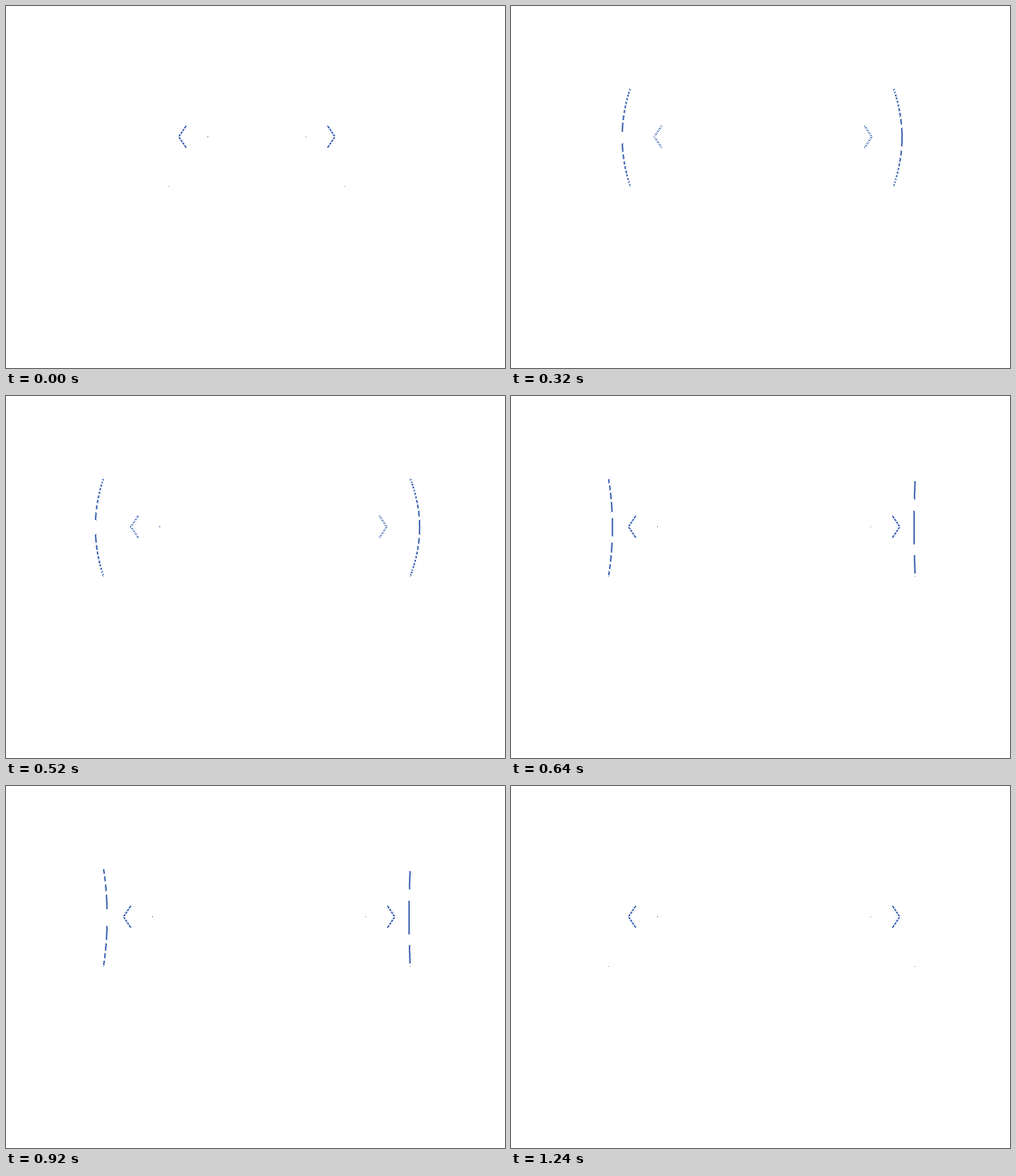
An HTML page with a canvas for the animation above (1640 ms loop, 550x400 px).

```html
<!DOCTYPE html>
<html lang="en">
<head>
<meta charset="utf-8">
<title>Flexing arcs</title>
<style>
html, body { margin: 0; width: 100%; height: 100%; overflow: hidden; background: #fff; }
canvas { display: block; width: 550px; height: 400px; }
</style>
</head>
<body>
<canvas id="stage" width="550" height="400"></canvas>
<script>
const LOOP = 1640, TICK = 40, LAST = 31;
const INK = [0, 51, 153];
const SUB = 4; // samples per pixel, each way
const SOLID = 13; // sample count from which a pixel counts as solid ink
const AREA = { x: 85, y: 85, w: 385, h: 120 };
const TOP = 91, BOTTOM = 199.25, AXIS = 144.5;

// dir: outward direction; bend: [tick, sagitta] keys
const sides = [
  { dir: -1, end: 179.5, tip: 190.5, tail: 222.6, travel: 61,
    bend: [[0, 0], [12, 13.5], [18, -13.2], [28, 5.2], [31, 0]] },
  { dir: 1, end: 373.5, tip: 362.5, tail: 330.75, travel: 66,
    bend: [[0, 0], [12, 14.3], [18, -9.1], [28, 6.5], [31, 0]] }
];

const ctx = document.getElementById('stage').getContext('2d');
const image = ctx.createImageData(AREA.w, AREA.h);
const fine = document.createElement('canvas');
fine.width = AREA.w * SUB;
fine.height = AREA.h * SUB;
const pen = fine.getContext('2d', { willReadFrequently: true });
pen.setTransform(SUB, 0, 0, SUB, -AREA.x * SUB, -AREA.y * SUB);
pen.lineWidth = 1;
pen.lineJoin = 'round';

function tween(keys, n) {
  let i = 1;
  while (i < keys.length - 1 && n > keys[i][0]) i++;
  const [n0, v0] = keys[i - 1], [n1, v1] = keys[i];
  return v0 + (v1 - v0) * (n - n0) / (n1 - n0);
}

function drawSide(side, n) {
  const { dir } = side;
  const x = side.end + dir * 6 * Math.min(n, 12);
  const shift = dir * side.travel * Math.min(n, 15) / 15;
  const tip = side.tip + shift, barb = tip - dir * 8;
  pen.beginPath();
  pen.moveTo(x, TOP);
  pen.quadraticCurveTo(x + dir * 2 * tween(side.bend, n), (TOP + BOTTOM) / 2, x, BOTTOM);
  pen.moveTo(barb, AXIS - 12);
  pen.lineTo(tip, AXIS);
  pen.lineTo(barb, AXIS + 12);
  pen.moveTo(tip, AXIS);
  pen.lineTo(side.tail + shift, AXIS);
  pen.stroke();
}

// Solid ink is see-through: only the soft edge pixels of each line show.
function showEdges() {
  const src = pen.getImageData(0, 0, fine.width, fine.height).data;
  const hits = new Uint8Array(AREA.w * AREA.h);
  for (let i = 3, p = 0; i < src.length; i += 4, p++) {
    if (src[i] < 128) continue;
    const row = Math.floor(p / fine.width), col = p % fine.width;
    hits[Math.floor(row / SUB) * AREA.w + Math.floor(col / SUB)]++;
  }
  hits.forEach((count, i) => {
    const a = count >= SOLID ? 0 : Math.pow(count / (SUB * SUB), 0.7);
    INK.forEach((c, k) => { image.data[i * 4 + k] = 255 + (c - 255) * a; });
    image.data[i * 4 + 3] = 255;
  });
  ctx.putImageData(image, AREA.x, AREA.y);
}

let shown = -1;
function render(ms) {
  const n = Math.min(LAST, Math.floor((ms % LOOP) / TICK));
  if (n === shown) return;
  shown = n;
  pen.clearRect(AREA.x, AREA.y, AREA.w, AREA.h);
  sides.forEach(side => drawSide(side, n));
  showEdges();
}

const start = performance.now();
function frame() {
  render(performance.now() - start);
  requestAnimationFrame(frame);
}
render(0);
requestAnimationFrame(frame);
</script>
</body>
</html>
```
